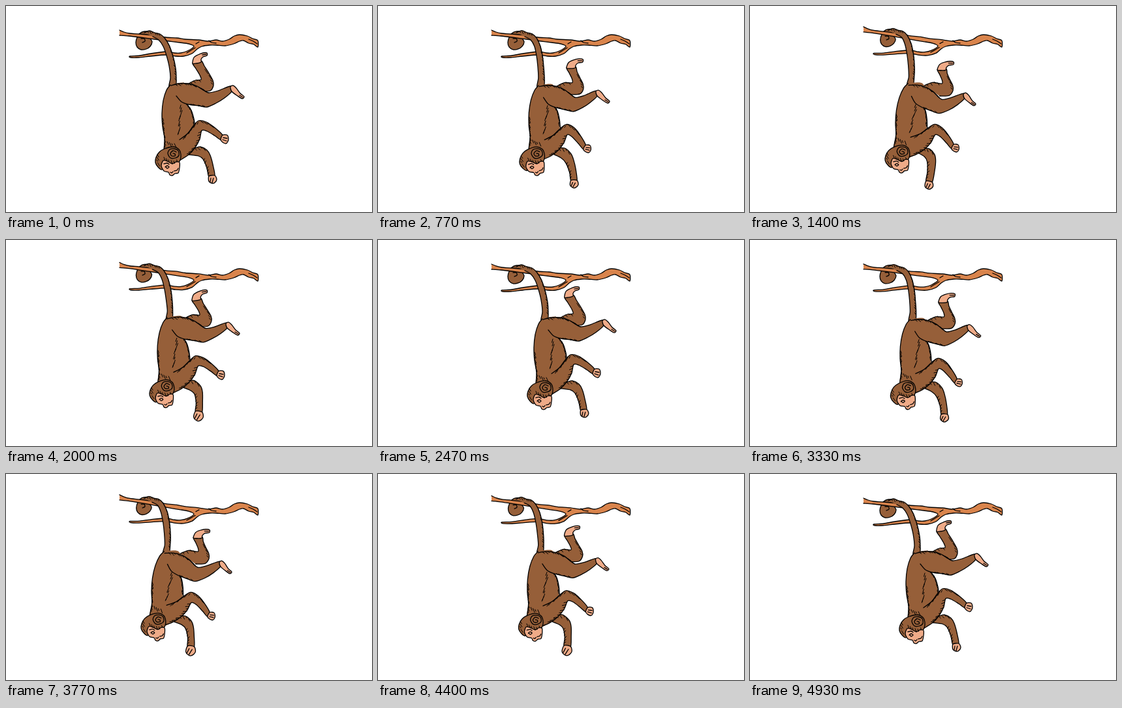
An HTML page with a canvas that plays this animation: 561x316 px, repeating every 5.01 s.

```html
<!DOCTYPE html>
<html lang="en">
<head>
<meta charset="utf-8">
<title>Swinging monkey</title>
<style>
  html, body { margin: 0; width: 100%; height: 100%; overflow: hidden; background: #fff; }
  canvas { display: block; width: 561px; height: 316px; }
</style>
</head>
<body>
<canvas id="stage"></canvas>
<script>
const W = 561, H = 316, LOOP = 5010;
const FUR = '#965f39', SKIN = '#efab88', WOOD = '#d9844c';
const canvas = document.getElementById('stage');
const ctx = canvas.getContext('2d');
const ratio = window.devicePixelRatio || 1;
canvas.width = W * ratio;
canvas.height = H * ratio;

const parse = text => text.trim().split(/\s+/).map(p => p.split(',').map(Number));

// Joint chains, one row per pose: right, drifting left, middle, left, returning, left with arm trailing
const rig = {
  tail: ['211,56 241,50 256,98 256,124', '211,56 241,50 253,98 253,125', '211,56 241,50 250,98 250,125',
         '211,52 239,46 248,98 246,122', '211,54 240,48 251,98 251,122'],
  body: ['256,124 258,214', '253,125 254,214', '250,125 247,212', '246,122 237,210', '251,122 249,212'],
  head: ['256,226 254,260', '251,226 250,260', '243,226 244,260', '233,223 232,256', '246,224 245,257'],
  leg: ['268,134 308,144 345,127 364,140', '265,135 305,147 342,130 361,143', '261,137 300,151 335,134 354,147',
        '255,136 291,154 328,138 345,151', '262,134 303,146 338,131 357,144'],
  farLeg: ['286,120 311,122 292,86 308,73', '283,122 310,124 294,91 313,77', '281,124 308,127 295,94 314,83',
           '274,124 304,129 293,97 312,87', '281,121 308,124 291,91 308,78'],
  arm: ['272,212 298,184 331,202 338,208', '268,213 295,187 323,212 331,217', '260,213 290,190 317,217 324,222',
        '250,210 284,190 311,216 318,221', '262,211 293,186 325,205 332,211'],
  farArm: ['290,222 307,226 316,261 317,270', '286,223 302,229 314,263 315,271', '277,222 294,232 301,268 300,277',
           '266,222 280,232 275,270 274,279', '278,220 296,229 296,264 294,275', '266,222 282,230 284,265 282,276']
};
for (const name in rig) rig[name] = rig[name].map(parse);

const keys = [[0, 0], [500, 1], [770, 2], [1270, 5], [1400, 3], [2000, 4], [2500, 0],
              [3000, 1], [3270, 2], [3770, 5], [4050, 5], [4550, 4], [4930, 0]];

// [chain, fill, mode, outline]; fur modes carry the tick vector
const parts = [
  ['tail', FUR, 'closed', '224,40 212,39 205,42 201,48 199,56 201,63 207,67 215,66 221,62 224,55 221,49'],
  ['tail', '', 'open', '207,50 212,50 213,54 209,56'],
  ['branch', WOOD, 'open', '174,37 181,40 190,42 205,43 225,45 245,48 262,49 275,51 295,52 310,54 322,52 332,54 342,51 350,46 358,44 370,46 378,50 386,53'
    + ' 386,63 380,59 372,57 364,53 358,54 349,58 336,61 322,60 312,60 300,62 293,66 285,73 272,77 260,77 245,75 222,77 204,79 191,79'
    + ' 190,77 205,76 222,73 245,70 258,72 268,72 278,69 288,62 280,58 266,56 250,54 228,51 205,48 188,46 174,45'],
  ['branch', '', 'open', '311,53 315,56 322,57'],
  ['branch', '', 'open', '277,72 285,67 290,64'],
  ['branch', '', 'open', '291,58 296,55'],
  ['branch', '', 'open', '372,51 379,54 385,58'],
  ['tail', FUR, 'open', '212,41 220,38 228,41 236,43 243,49 250,60 256,77 260,95 261,110 260,123 250,124 252,110 250,92 246,76 241,62 234,52 225,47'],
  ['tail', '', 'fur -2 -3', '244,50 251,62 257,80 260,98 261,118'],
  ['tail', '', 'fur 2 3', '217,39 228,41 238,45'],
  ['farLeg', FUR, 'open', '280,119 290,114 299,113 297,106 291,96 286,87 299,84 304,92 311,103 317,114 318,122 313,130 300,131'],
  ['farLeg', '', 'fur -3 -4', '307,100 315,112 317,124'],
  ['farLeg', '', 'fur 3 3', '283,117 292,113 299,114'],
  ['farLeg', SKIN, 'closed', '286,88 288,79 294,75 302,72 308,72 308,76 302,78 299,82 299,86 292,88'],
  ['farLeg', '', 'open', '301,75 307,74'],
  ['farArm', FUR, 'open', '278,222 290,218 298,216 308,221 313,229 317,243 320,261 311,262 308,249 302,235 295,230 280,228'],
  ['farArm', '', 'fur 2 -4', '303,237 308,250 311,261'],
  ['farArm', '', 'fur 3 3', '290,219 299,217 307,221'],
  ['farArm', SKIN, 'closed', '311,261 320,260 323,266 320,271 316,272 311,269'],
  ['farArm', '', 'open', '314,264 313,270'],
  ['farArm', '', 'open', '318,264 316,271'],
  ['body', FUR, 'fill', '252,121 246,129 241,145 239,165 240,185 243,203 242,222 250,234 266,237 280,226 290,212 290,195 288,178 284,160 278,150 285,140 275,119 260,119'],
  ['body', '', 'open', '252,121 246,129 241,145 239,165 240,185 243,203 242,222'],
  ['body', '', 'open', '277,150 284,160 288,173 290,186'],
  ['body', '', 'fur 2 5', '240,172 241,188 243,205 243,219'],
  ['body', '', 'fur -2 -6', '277,152 284,162 288,176 289,188'],
  ['body', '', 'fur -2 7', '268,152 270,160 266,172 267,186 263,198'],
  ['body', '', 'fur 3 6', '247,208 254,211 262,211'],
  ['leg', FUR, 'open', '253,122 265,119 280,119 293,123 304,130 311,133 325,130 344,123 346,131 335,141 322,149 308,155 295,153 280,151 269,147 261,138'],
  ['leg', '', 'fur 5 3', '259,120 272,118 286,121 299,126 308,132'],
  ['leg', '', 'fur -5 -2', '287,152 300,154 309,154'],
  ['leg', SKIN, 'closed', '344,124 348,122 353,126 359,134 365,139 362,142 355,138 346,131'],
  ['leg', '', 'open', '358,137 363,140'],
  ['arm', FUR, 'open', '266,205 278,196 287,184 295,176 307,178 318,185 332,198 329,205 320,199 308,192 300,191 297,204 290,217 280,228 266,237'],
  ['arm', '', 'fur -3 6', '274,200 283,190 291,180 298,177'],
  ['arm', '', 'fur -5 2', '299,193 297,205 290,217 279,228'],
  ['arm', '', 'fur 5 3', '299,177 309,180 319,187'],
  ['arm', SKIN, 'closed', '332,198 339,198 341,203 340,208 337,211 332,209 329,205'],
  ['arm', '', 'open', '333,202 339,203'],
  ['arm', '', 'open', '332,205 338,207'],
  ['head', FUR, 'closed', '243,219 235,224 230,232 229,240 233,247 239,251 246,242 262,242 267,236 268,228 265,220 256,216'],
  ['head', SKIN, 'closed', '241,237 238,245 242,253 249,255 251,259 255,260 259,257 264,256 266,248 266,240 261,239 255,242 247,238'],
  ['head', '', 'fur 3 5', '232,228 231,236 234,245'],
  ['head', '', 'fur 2 5', '242,232 249,236 257,238 266,234'],
  ['head', FUR, 'closed', '248,226 251,220 258,219 264,222 265,229 260,233 252,233'],
  ['head', '', 'open', '261,224 256,222 252,226 254,230 259,230 259,227 256,226'],
  ['head', '', 'open', '242,242 247,241 250,243'],
  ['head', '', 'open', '244,247 247,245 250,247 247,249 245,247'],
  ['head', '', 'open', '252,255 254,256 256,254'],
  ['head', '', 'open', '258,253 262,252 264,249']
].map(([chain, fill, mode, text]) => {
  const [kind, dx, dy] = mode.split(' ');
  const points = parse(text);
  return { chain, fill, kind, points: kind === 'fur' ? ticks(points, +dx, +dy) : points };
});

// Short strokes spread along a line, as start/end pairs
function ticks(line, dx, dy) {
  const out = [];
  let n = 0;
  for (let i = 1; i < line.length; i++) {
    const [ax, ay] = line[i - 1], [bx, by] = line[i];
    const count = Math.max(1, Math.round(Math.hypot(bx - ax, by - ay) / 4.2));
    for (let k = 0; k < count; k++, n++) {
      const x = ax + (bx - ax) * k / count, y = ay + (by - ay) * k / count;
      const size = 0.75 + 0.3 * Math.sin(n * 2.4);
      out.push([x, y], [x + dx * size, y + dy * size]);
    }
  }
  return out;
}

function boneWeights(joints, [x, y]) {
  const list = [];
  for (let i = 0; i + 1 < joints.length; i++) {
    const [ax, ay] = joints[i], vx = joints[i + 1][0] - ax, vy = joints[i + 1][1] - ay;
    const u = Math.min(1, Math.max(0, ((x - ax) * vx + (y - ay) * vy) / (vx * vx + vy * vy)));
    const d2 = (x - ax - u * vx) ** 2 + (y - ay - u * vy) ** 2;
    list.push(1 / (d2 + 4) ** 2);
  }
  const sum = list.reduce((a, b) => a + b);
  return list.map(w => w / sum);
}
for (const part of parts) {
  if (rig[part.chain]) part.weights = part.points.map(p => boneWeights(rig[part.chain][0], p));
}

function keyAt(i) {
  const n = keys.length, turn = Math.floor(i / n);
  const [time, pose] = keys[i - turn * n];
  return [time + turn * LOOP, pose];
}

// Monotone cubic between the keys around t
function sampler(t) {
  let i = 0;
  while (i + 1 < keys.length && keys[i + 1][0] <= t) i++;
  const k = [-1, 0, 1, 2].map(o => keyAt(i + o));
  const span = k[2][0] - k[1][0], u = (t - k[1][0]) / span;
  return value => {
    const v = k.map(key => value(key[1]));
    const slope = j => (v[j] - v[j - 1]) * (v[j + 1] - v[j]) <= 0 ? 0
      : (v[j + 1] - v[j - 1]) / (k[j + 1][0] - k[j - 1][0]);
    return v[1] * (1 + 2 * u) * (1 - u) ** 2 + v[2] * u * u * (3 - 2 * u)
      + span * (slope(1) * u * (1 - u) ** 2 - slope(2) * u * u * (1 - u));
  };
}

function jointsAt(t) {
  const sample = sampler(t), now = {};
  for (const name in rig) {
    const poses = rig[name];
    now[name] = poses[0].map((_, j) => [0, 1].map(axis =>
      sample(pose => (poses[pose] || poses[3])[j][axis])));
  }
  return now;
}

// Each bone turns and scales its points; the results are blended
function skin(part, now) {
  if (part.chain === 'branch') {
    const lift = 56 - now.tail[0][1];
    return part.points.map(([x, y]) => [x, y - lift * 1.3 * Math.max(0, 1 - (x - 174) / 126)]);
  }
  const rest = rig[part.chain][0], live = now[part.chain];
  const bones = rest.slice(1).map((end, i) => {
    const vx = end[0] - rest[i][0], vy = end[1] - rest[i][1];
    const wx = live[i + 1][0] - live[i][0], wy = live[i + 1][1] - live[i][1];
    const len = vx * vx + vy * vy;
    return [(wx * vx + wy * vy) / len, (wy * vx - wx * vy) / len];
  });
  return part.points.map(([x, y], n) => {
    let sx = 0, sy = 0;
    bones.forEach(([c, s], i) => {
      const w = part.weights[n][i], px = x - rest[i][0], py = y - rest[i][1];
      sx += w * (live[i][0] + c * px - s * py);
      sy += w * (live[i][1] + s * px + c * py);
    });
    return [sx, sy];
  });
}

function trace(points, closed) {
  const n = points.length;
  const at = i => closed ? points[(i + n) % n] : points[Math.min(n - 1, Math.max(0, i))];
  ctx.moveTo(...points[0]);
  for (let i = 0; i < (closed ? n : n - 1); i++) {
    const [a, b, c, d] = [at(i - 1), at(i), at(i + 1), at(i + 2)];
    ctx.bezierCurveTo(b[0] + (c[0] - a[0]) / 7, b[1] + (c[1] - a[1]) / 7,
      c[0] - (d[0] - b[0]) / 7, c[1] - (d[1] - b[1]) / 7, c[0], c[1]);
  }
}

function draw(t) {
  const now = jointsAt(t);
  ctx.setTransform(ratio, 0, 0, ratio, 0, 0);
  ctx.fillStyle = '#fff';
  ctx.fillRect(0, 0, W, H);
  ctx.strokeStyle = '#000';
  ctx.lineJoin = ctx.lineCap = 'round';
  for (const part of parts) {
    const points = skin(part, now);
    ctx.beginPath();
    if (part.kind === 'fur') {
      for (let i = 0; i < points.length; i += 2) {
        ctx.moveTo(...points[i]);
        ctx.lineTo(...points[i + 1]);
      }
    } else {
      trace(points, part.kind !== 'open');
    }
    if (part.fill) {
      ctx.fillStyle = part.fill;
      ctx.fill();
    }
    ctx.lineWidth = part.kind === 'fur' ? 1 : 1.3;
    if (part.kind !== 'fill') ctx.stroke();
  }
}

const start = performance.now();
function frame() {
  draw((performance.now() - start) % LOOP);
  requestAnimationFrame(frame);
}
frame();
</script>
</body>
</html>
```
